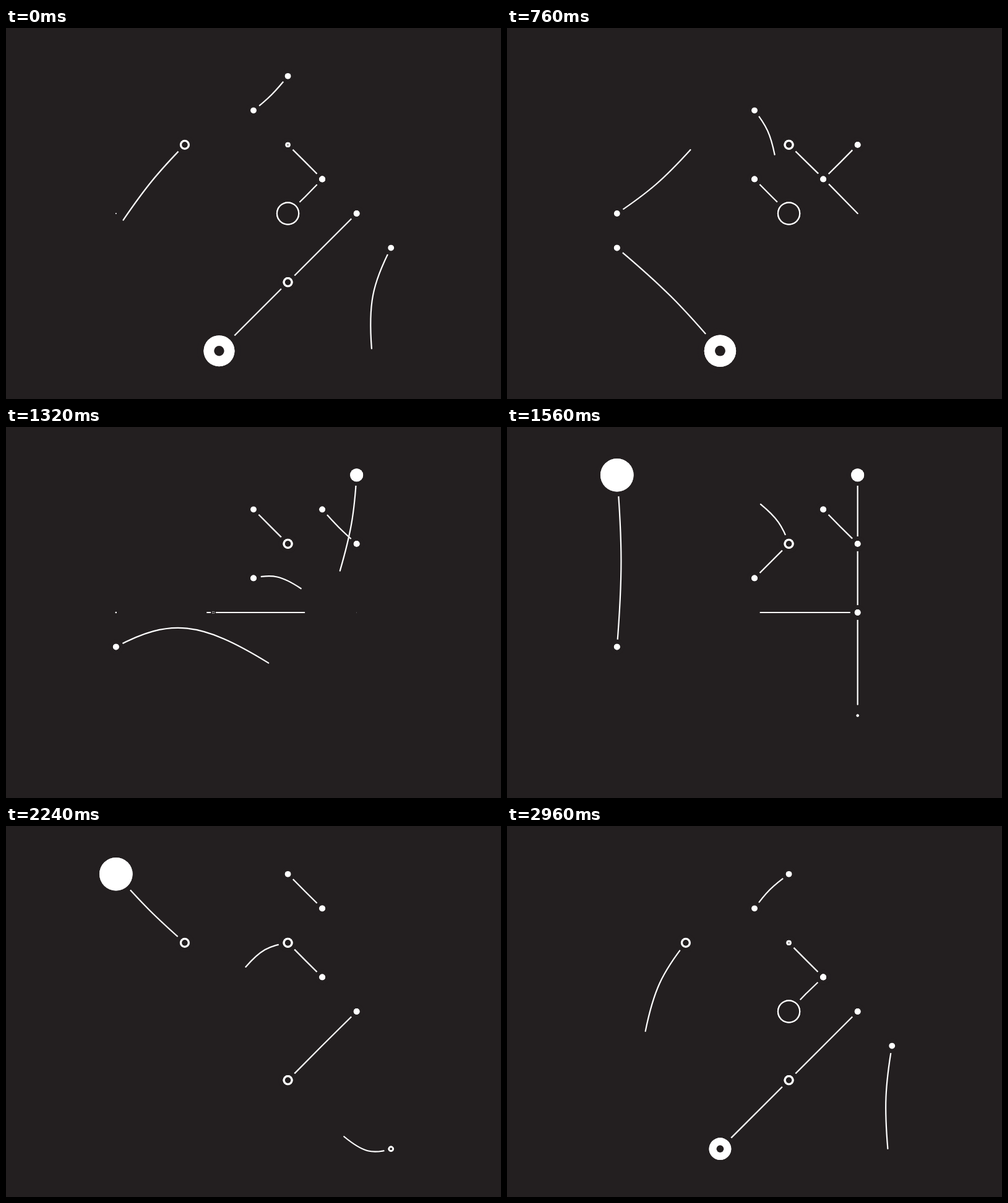
These frames come from a looping animation (800x600 px, 3 s). An HTML page with a canvas:

```html
<!DOCTYPE html>
<html lang="en">
<head>
<meta charset="utf-8">
<title>Swinging lines</title>
<style>
html, body { margin: 0; width: 100%; height: 100%; overflow: hidden; background: #231f20; }
canvas { display: block; width: 800px; height: 600px; }
</style>
</head>
<body>
<canvas id="stage" width="800" height="600"></canvas>
<script>
const ctx = document.getElementById('stage').getContext('2d');
const LOOP = 3000, UNIT = 500 / 9;
const LAG = 36, SLIDE = 220, GROW = 170, EARLY = 140;
const BG = '#231f20', FG = '#fff';
const D1 = Math.SQRT2, D2 = 2 * D1, D3 = 3 * D1;

const gx = c => 1600 / 9 + c * UNIT;
const gy = r => 700 / 9 + r * UNIT;
const mod = (a, n) => ((a % n) + n) % n;
const mix = (a, b, k) => a + (b - a) * k;
const ease = u => u <= 0 ? 0 : u >= 1 ? 1 : u < .5 ? 4 * u ** 3 : 1 - 4 * (1 - u) ** 3;
const polar = (p, deg, len) => {
  const a = deg * Math.PI / 180;
  return { x: p.x + Math.cos(a) * len, y: p.y + Math.sin(a) * len };
};

// Outer radius, hole radius, clear space kept around the node.
const kinds = {
  dot: [4.9, 0, 11.8],
  disc: [10.5, 0, 17],
  moon: [26.8, 0, 34.5],
  ring: [8.1, 4.8, 15],
  thin: [7.6, 6.4, 14.5],
  mini: [4.1, 1, 11],
  bead: [4.7, 1.9, 11],
  hoop: [18.7, 16.5, 26],
  donut: [25.7, 8.4, 36]
};

// A line that walks over the grid: each swing turns it around its head,
// and the point where the other end lands becomes the new head.
class Strand {
  constructor(loops, x, y, dir, len, walk) {
    Object.assign(this, { loops, dir, len, span: loops * LOOP, head: { x, y }, moves: [], nodes: [], base: 0 });
    walk(this);
    this.base = this.span; // second round closes the nodes left open by the first
    walk(this);
  }

  land(kind, at, time) {
    if (!kind) return null;
    const node = { ...at, size: kinds[kind], on: time - EARLY };
    this.nodes.push(node);
    return node;
  }

  leave(node, time) {
    if (node) node.off = time;
  }

  swing(time, turn, kind = 'dot', len = this.len, dur = 300 + Math.abs(turn) / 2) {
    const t0 = this.base + time, { head, dir, len: len0 } = this;
    this.leave(this.tailNode, t0 - 60);
    this.leave(this.passed, t0 - 60);
    this.moves.push({ t0, draw: t => drawSwing(head, dir, turn, len0, len, dur, t - t0) });
    this.head = polar(head, dir + turn, len);
    this.dir = dir + turn + 180;
    this.len = len;
    this.passed = null;
    this.tailNode = this.headNode;
    this.headNode = this.land(kind, this.head, t0 + dur + LAG);
    return this;
  }

  // Head and tail each move forward by their own distance.
  slide(time, ahead, behind, kind = 'dot') {
    const t0 = this.base + time, { head, dir, len } = this;
    this.moves.push({ t0, draw(t) {
      const k = ease((t - t0) / SLIDE);
      drawLine(polar(head, dir, -ahead * k), polar(head, dir, len - behind * k));
    } });
    if (behind) {
      this.leave(this.tailNode, t0 + 20);
      this.tailNode = null;
    }
    if (ahead) {
      if (behind) this.leave(this.headNode, t0 + 20);
      else this.passed = this.headNode;
      this.head = polar(head, dir, -ahead);
      this.headNode = this.land(kind, this.head, t0 + SLIDE);
    }
    this.len += ahead - behind;
    return this;
  }

  times(t) {
    return Array.from({ length: this.loops }, (_, i) => t + i * LOOP);
  }

  draw(t) {
    for (let time of this.times(t)) {
      if (time < this.moves[0].t0) time += this.span;
      this.moves.filter(m => m.t0 <= time).pop().draw(time);
    }
  }

  live(t) {
    return this.times(t).flatMap(time => this.nodes.filter(n => n.off).map(n => {
      const age = mod(time - n.on, this.span);
      return { ...n, s: ease(age / GROW) * (1 - ease((age - n.off + n.on) / GROW)) };
    })).filter(n => n.s > 0);
  }
}

function drawLine(a, b) {
  ctx.beginPath();
  ctx.moveTo(gx(a.x), gy(a.y));
  ctx.lineTo(gx(b.x), gy(b.y));
  ctx.stroke();
}

// The tip follows the root a little later, then the line quivers.
function drawSwing(head, dir, turn, len0, len1, dur, t) {
  const k = ease((t - LAG) / dur), len = mix(len0, len1, k);
  const tipDir = dir + turn * k;
  const tip = polar(head, tipDir, len);
  let bow = polar(head, dir + turn * ease(t / dur), len / 2);
  const after = t - dur - LAG;
  if (after > 0) {
    const power = Math.min(14, Math.abs(turn) / 6) / UNIT;
    const bend = -Math.sign(turn) * power * Math.exp(-after / 110) * Math.sin(after * Math.PI / 50);
    bow = polar(bow, tipDir + 90, bend);
  }
  const pull = p => [gx(mix(p.x, bow.x, .8)), gy(mix(p.y, bow.y, .8))];
  ctx.beginPath();
  ctx.moveTo(gx(head.x), gy(head.y));
  ctx.bezierCurveTo(...pull(head), ...pull(tip), gx(tip.x), gy(tip.y));
  ctx.stroke();
}

const strands = [
  new Strand(3, 4, 1, -45, D1, s => s
    .swing(406, -270, 'ring')
    .swing(1433, 180)
    .swing(2350, -90, 'hoop')
    .swing(3189, 270)
    .swing(4130, -90, 'mini')
    .swing(5100, 270)
    .swing(6089, 90)
    .swing(6937, 90)
    .swing(7714, 180)
    .swing(8501, 90)),
  new Strand(2, 0, 4, -45, D2, s => s
    .swing(634, 45, 'thin')
    .slide(1200, 7 - D2, 7 - D2)
    .swing(1738, -45, 'ring')
    .slide(2783, D2, 0, 'donut')
    .slide(3050, 0, D1)
    .swing(3350, -90)
    .swing(4132, -135, 'moon', 5)
    .slide(4640, 0, 5 - D2)
    .swing(4850, -45, 'ring')
    .swing(5606, 270)),
  new Strand(1, 6, 3, 45, D2, s => s
    .slide(215, D1, D1, 'ring')
    .swing(710, -90, 'disc')
    .swing(1085, -45, null)
    .slide(1400, 7 - D2, 0)
    .slide(1580, 0, 7 - D1)
    .swing(1780, 135, 'bead', D1, 270)
    .swing(2073, -315, null)
    .slide(2560, 3 - D1, 0)
    .swing(2865, 135, 'dot', D2))
];

function disc({ x, y }, r, color) {
  ctx.fillStyle = color;
  ctx.beginPath();
  ctx.arc(gx(x), gy(y), r, 0, Math.PI * 2);
  ctx.fill();
}

function frame() {
  const t = performance.now() % LOOP;
  ctx.fillStyle = BG;
  ctx.fillRect(0, 0, 800, 600);

  ctx.strokeStyle = FG;
  ctx.lineWidth = 2.2;
  ctx.lineCap = 'round';
  strands.forEach(s => s.draw(t));

  const live = strands.flatMap(s => s.live(t)).sort((a, b) => a.size[0] * a.s - b.size[0] * b.s);
  live.forEach(n => disc(n, n.size[2] * n.s, BG));
  live.forEach(n => {
    disc(n, n.size[0] * n.s, FG);
    if (n.size[1]) disc(n, n.size[1] * n.s, BG);
  });
  requestAnimationFrame(frame);
}
frame();
</script>
</body>
</html>
```
